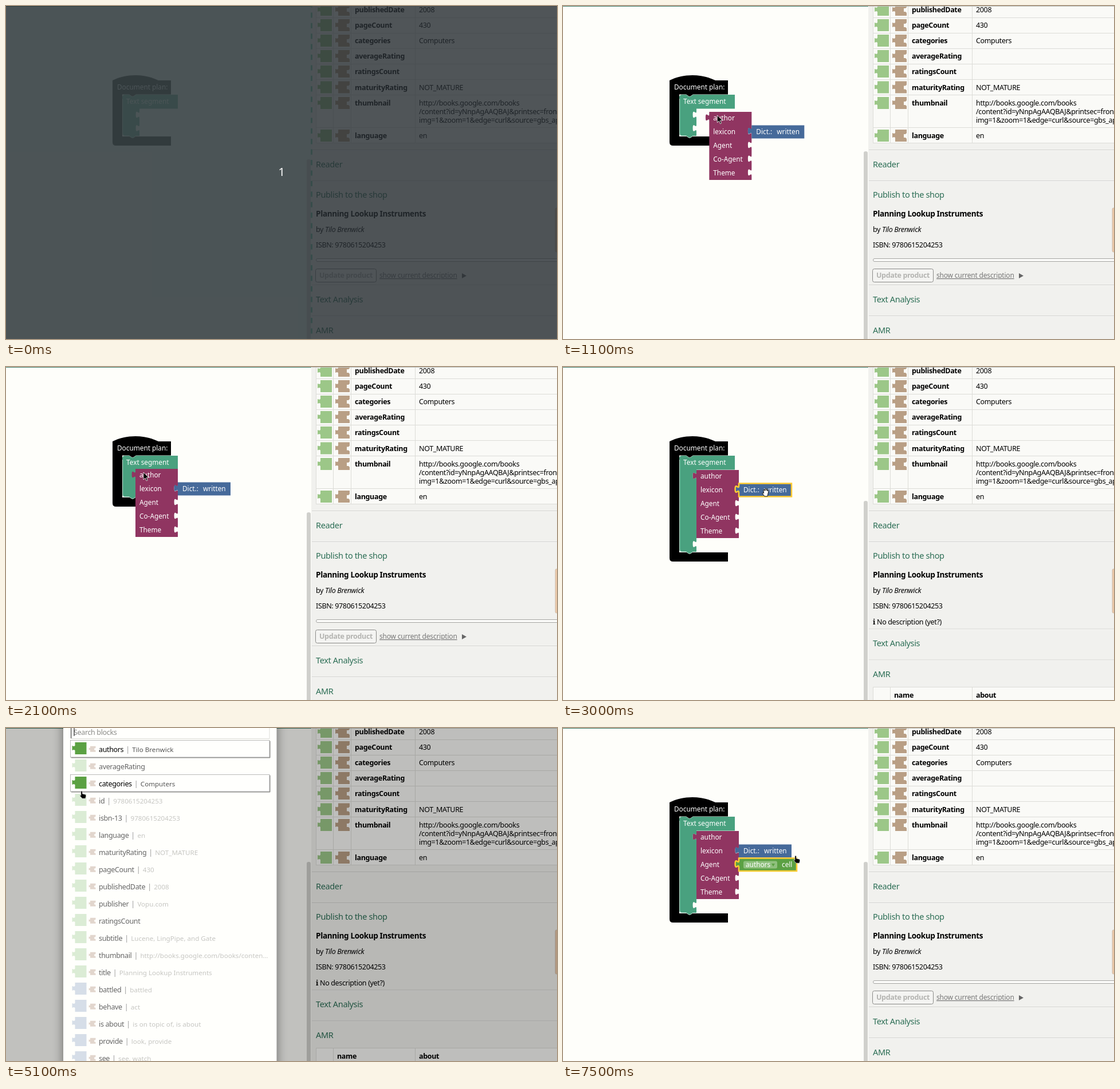
Write an HTML page that moves like this. It is 962 by 582 pixels and loops after 8000 ms.

```html
<!DOCTYPE html>
<html lang="en">
<head>
<meta charset="utf-8">
<title>Block editor</title>
<style>
  html, body { margin: 0; width: 100%; height: 100%; overflow: hidden; background: #fefefa; }
  svg { display: block; width: 962px; height: 582px; }
  text { font: 12.5px "Noto Sans", "Open Sans", sans-serif; letter-spacing: -.35px; white-space: pre; }
  .bold { font-weight: 600; }
  .title { font-weight: 600; font-size: 13.5px; }
  .head { font-size: 14.5px; fill: #2c6e55; }
  .link { font-size: 12px; letter-spacing: -.2px; fill: #777; text-decoration: underline; }
  .block { font-size: 11.8px; letter-spacing: 0; fill: #fff; }
  .value { font-size: 11.6px; letter-spacing: 0; }
  .count { font-size: 20px; fill: #fff; text-anchor: middle; }
</style>
</head>
<body>
<svg id="stage" viewBox="0 0 962 582"></svg>
<script>
const LOOP = 8000;
const YELLOW = '#fc3';
const PERSON = 'Tilo Brenwick';
const BOOK = 'Planning Lookup Instruments';
const ISBN = '9780615204253';

const stage = document.getElementById('stage');

// Last entry of a step table whose time has come
const at = (steps, t) => steps.filter(s => s[0] <= t).pop();

const text = (x, y, s, cls = '', more = '') =>
  `<text x="${x}" y="${y}" class="${cls}" ${more}>${s.replace(/&/g, '&amp;')}</text>`;
const rect = (x, y, w, h, fill, more = '') =>
  `<rect x="${x}" y="${y}" width="${w}" height="${h}" fill="${fill}" ${more}/>`;
const path = (d, fill, more = '') => `<path d="${d}" fill="${fill}" ${more}/>`;
const outline = on => on ? `stroke="${YELLOW}" stroke-width="2.5"` : '';

// Puzzle connector, drawn downwards and upwards
const DOWN = 'c0 8-6.4-6.4-6.4 6s6.4-2 6.4 6';
const UP = 'c0-8-6.4 6.4-6.4-6s6.4 2 6.4-6';

function piece(x, y, w, h, notches = []) {
  const right = notches.map(n => `V${y + n + 4}${DOWN}`).join('');
  return `M${x} ${y}h${w}${right}V${y + h}H${x}V${y + 16}${UP}z`;
}

/* ---------- workspace ---------- */

function plan(b) {
  const doc = `M186 130c24-12 56-12 80 0H288V154.5H227l-4.8 3.2h-2.4l-4.8-3.2H203V${b + 1}H288V${b + 17}H192q-6 0-6-6z`;
  const segment = `M208 155h7l4.8 3.2h2.4l4.8-3.2H300V179.5H233V184${DOWN}V${b - 19.5}${DOWN}V${b}` +
    `H227l-4.8 3.2h-2.4l-4.8-3.2H208q-5 0-5-5V160q0-5 5-5z`;
  return path(doc, '#000') + path(segment, '#49a17f') +
    path(`M203.5 162V${b - 5}q0 5 5 5h6.5l4.8 3.2h2.4l4.8-3.2`, 'none', 'stroke="#c4e3d5"') +
    text(194, 146, 'Document plan:', 'block') + text(210, 171, 'Text segment', 'block');
}

function author(x, y, picked) {
  const labels = ['author', 'lexicon', 'Agent', 'Co-Agent', 'Theme'];
  const body = path(piece(x, y, 74, 119, [24, 48, 72, 96]), '#903561', outline(picked === 'author'));
  const dict = path(piece(x + 74, y + 23.5, 92, 23), '#466a9a', outline(picked === 'dict'));
  return body + labels.map((s, i) => text(x + 7, y + 15 + i * 24, s, 'block')).join('') + dict +
    text(x + 82, y + 39, 'Dict.:', 'block') + text(x + 118, y + 39, 'written', 'block');
}

const cell = () =>
  path(piece(307, 227.5, 101, 22.5), '#5ba143', outline(true)) +
  rect(315, 232.5, 59, 13, '#8fc07e', 'rx="3"') +
  text(319, 243, 'authors', 'block') + path('M364 237h6l-3 5z', '#5ba143') +
  text(382, 243, 'cell', 'block');

const DROP = [
  [1300, 250, 178], [1400, 244, 177], [1500, 236, 176],
  [1800, 232, 176], [1900, 229, 177], [2000, 227, 178], [2100, 226, 178], [2400, 233, 180]
];

function dragged(t) {
  if (t >= 1300) return at(DROP, t).slice(1);
  const left = (1 - (t - 500) / 800) ** 2;
  return [250 + 85 * left, 178 + 110 * left];
}

function workspace(t) {
  const tall = t >= 2400;
  const top = tall ? 234 : t >= 500 ? 254 : 268;
  let s = rect(0, 0, 534, 582, '#fefefa') + plan(tall ? 323 : 227);
  if (t < 500) s += rect(0, 1, 534, 582, 'rgba(199,235,221,.5)');
  s += rect(525, top, 7, 400, t < 500 ? '#ced1cc' : '#d0d0cc', 'rx="3"');
  return s + rect(0, 0, 534, 1, '#3f7c69');
}

/* ---------- right panel ---------- */

// Small square piece with a stubby tab, and a socket if asked for
function icon(x, y, fill, socket = false, size = 20) {
  const u = size / 20;
  const right = socket ? `v${6 * u}l${-2 * u} ${2 * u}h${-3 * u}v${6 * u}h${3 * u}l${2 * u} ${2 * u}` : '';
  return path(`M${x} ${y - 10 * u}h${size}${right}V${y + 11 * u}H${x}V${y + 4 * u}` +
    `l${-2 * u} ${-u}l${-3 * u} ${u}v${-8 * u}l${3 * u} ${u}l${2 * u} ${-u}z`, fill);
}

const vline = (x, y, h) => rect(x, y, 1, h, '#dcdcd8');
const divider = y => rect(534, y, 428, 1, '#d2d2cf') + rect(534, y + 1, 428, 1, '#f8f8f6');

const FIELDS = [
  [6, 'publishedDate', '2008'], [33, 'pageCount', '430'], [60, 'categories', 'Computers'],
  [87, 'averageRating', ''], [114, 'ratingsCount', ''], [141.5, 'maturityRating', 'NOT_MATURE'],
  [169, 'thumbnail', 'http://books.google.com/books'], [226, 'language', 'en']
];

function fields() {
  let s = rect(541, 0, 421, 240, '#fafaf7');
  s += [20, 47, 74, 101, 128, 155, 212, 239].map(y => rect(541, y, 421, 1, '#dcdcd8')).join('');
  s += [541, 571, 602, 714].map(x => vline(x, 0, 240)).join('');
  for (const [y, name, value] of FIELDS)
    s += icon(549, y, '#9cc788') + icon(580, y, '#b99f85', true) +
      text(609, y + 5, name, 'bold') + text(721, y + 5, value);
  return s + text(721, 188.5, '/content?id=yNnpAgAAQBAJ&printsec=frontcover') +
    text(721, 203.5, 'img=1&zoom=1&edge=curl&source=gbs_api');
}

function product() {
  return rect(541.5, 441.5, 440, 5, '#fbfbf9', 'rx="2.5" stroke="#a5a5a2"') +
    rect(540.5, 459.5, 106, 23, '#f4f4f2', 'rx="3" stroke="#8a8a88"') +
    text(547, 475, 'Update product', 'bold', 'fill="#b4b4b1"') +
    text(652, 475, 'show current description', 'link') +
    path('M796 467v9l8-4.5z', '#666');
}

function missing() {
  return `<text x="541" y="449.5" style="font-family:'Noto Serif',serif;font-weight:700">i</text>` +
    text(548, 449.5, 'No description (yet?)') +
    rect(541, 559, 421, 23, '#fafaf7') + rect(541, 559, 421, 1, '#dcdcd8') +
    [541, 571, 714].map(x => vline(x, 559, 23)).join('') +
    text(578, 577.5, 'name', 'bold') + text(721, 577.5, 'about', 'bold');
}

function panel(t) {
  const empty = t >= 2400 && t < 7000;
  const up = empty ? 29.5 : 0;
  return rect(533, 0, 429, 582, '#f1f1ee') + fields() + rect(534, 0, 428, 1, '#bcc0bc') +
    [251, 305, 487 - up, 541 - up].map(divider).join('') +
    text(541, 281.5, 'Reader', 'head') + text(541, 335, 'Publish to the shop', 'head') +
    text(541, 368, BOOK, 'title') +
    `<text x="541" y="395">by <tspan font-style="italic">${PERSON}</tspan></text>` +
    text(541, 422, 'ISBN: ' + ISBN) +
    rect(959, 353, 10, 77, '#ecc9a8', 'rx="2" stroke="#c9b9a8" stroke-width=".8"') +
    (empty ? missing() : product()) +
    text(541, 517.5 - up, 'Text Analysis', 'head') + text(541, 571.5 - up, 'AMR', 'head');
}

/* ---------- block search ---------- */

const ENTRIES = [
  ['authors', PERSON], ['averageRating'], ['categories', 'Computers'], ['id', ISBN],
  ['isbn-13', ISBN], ['language', 'en'], ['maturityRating', 'NOT_MATURE'], ['pageCount', '430'],
  ['publishedDate', '2008'], ['publisher', 'Vopu.com'], ['ratingsCount'],
  ['subtitle', 'Lucene, LingPipe, and Gate'],
  ['thumbnail', 'http://books.google.com/books/conten…'], ['title', BOOK],
  ['battled', 'battled'], ['behave', 'act'], ['is about', 'is on topic of, is about'],
  ['provide', 'look, provide'], ['see', 'see, watch']
];

function entry([name, value], i, lit) {
  const y = 36.5 + i * 30;
  const word = i > 13;
  const full = word ? '#466a9a' : '#5ba143';
  const pale = word ? '#d6dee8' : '#dbecd5';
  let s = '';
  if (lit) s += rect(113.5, y - 14, 348, 30, '#8a8a87', 'rx="1"') +
    rect(112.5, y - 15, 347.5, 29.5, '#fffffd', 'stroke="#aaa" stroke-width=".8"');
  s += icon(120.5, y - 1.5, lit ? full : pale) + icon(147, y, '#e2d6cd', true, 9.5);
  s += `<text x="162" y="${y + 5}" fill="${lit ? '#000' : '#666'}">${name}`;
  if (value) s += `<tspan dx="4" fill="#999">|</tspan>` +
    `<tspan dx="4.5" class="value" fill="${lit ? '#555' : '#c6c6c2'}">${value}</tspan>`;
  return s + '</text>';
}

function search(t) {
  const [, x, y] = at(CURSOR, t);
  const hover = x > 113 && x < 460 ? Math.floor((y - 21.5) / 30) : 0;
  const focused = t < 6200;
  let s = rect(0, 0, 962, 582, 'rgba(0,0,0,.24)') +
    rect(100, -20, 372.5, 622, '#fffffc', 'style="filter:drop-shadow(0 0 9px rgba(0,0,0,.45))"') +
    rect(113.5, -8, 346.5, 26.5, '#fffffd', 'stroke="#ddddd9"') +
    text(118, 11.5, 'Search blocks', '', 'fill="#8b8b88"');
  if (focused) s += rect(113, 0, 1.2, 18, '#444') + rect(118.5, 0, 1, 14, '#000');
  else s += rect(112.5, 21.5, 348, 600, 'none', 'stroke="#555" stroke-dasharray="1 1"');
  return s + ENTRIES.map((e, i) => entry(e, i, i === 0 || i === hover)).join('');
}

/* ---------- cursor ---------- */

const HAND = 'M2 0q1.5 0 1.5 2v3l5 1.2q1.6.5 1.2 3l-1 4H3L-1 8.5q0-1.5 1-1l.8.6V1q.2-1 1.2-1z';
const SHAPES = {
  arrow: path('M0 0V13l3-3 2.2 5 2-1-2-4.7h4z', '#000', 'stroke="#fff" stroke-width=".8"'),
  point: path(HAND, '#000', 'stroke="#fff" stroke-width=".6"'),
  open: path('M1 4q0-2 1.5-1.5l1 2V1q1-1.5 2 0v3l.5-3q1.5-1 1.7.5V5l1-2q1.5 0 1.3 1.5L9 9l-1 5H3L-1 9q0-1.6 1.5-1l1 .7z', '#fff', 'stroke="#000" stroke-width=".9"')
};

const CURSOR = [
  [2400, 247, 186, 'arrow'], [2500, 262, 190, 'open'], [2600, 290, 198, 'open'],
  [2700, 322, 207, 'open'], [2900, 340, 211, 'open'], [3000, 349, 212, 'open'],
  [4000, 351, 217, 'point'], [4700, 330, 300, 'point'], [4900, 282, 268, 'point'],
  [5000, 205, 200, 'point'], [5100, 130, 110, 'point'], [5200, 75, 52, 'arrow'],
  [5300, 96, 34, 'arrow'], [5400, 161, 24, 'point'], [5600, 154, 24, 'arrow'],
  [5700, 147, 25, 'arrow'], [5800, 141, 25, 'arrow'], [5900, 137, 26, 'arrow'],
  [6600, 300, 160, 'arrow'], [6700, 399, 233, 'arrow'], [7500, 404, 223, 'point']
];

function cursor(t) {
  if (t < 500) return '';
  let [, x, y, kind] = at(CURSOR, t) || [];
  if (t < 2400) {
    [x, y] = dragged(t);
    x += 14; y += 6; kind = 'arrow';
  }
  return `<g transform="translate(${x} ${y})">${SHAPES[kind]}</g>`;
}

/* ---------- scene ---------- */

function scene(t) {
  let s = workspace(t) + panel(t);
  if (t >= 500) {
    const picked = t >= 6500 || t < 2400 ? '' : t >= 2900 ? 'dict' : 'author';
    s += author(...dragged(t), picked);
  } else {
    s += path('M533.5 -7V582', 'none', 'stroke="#7fccb2" stroke-width="3" stroke-dasharray="9.2 9.2"');
  }
  if (t >= 6500) s += cell();
  if (t >= 4000 && t < 6500) s += search(t);
  if (t < 100) s += rect(0, 0, 962, 582, 'rgba(38,44,49,.8)') + text(481, 297, '1', 'count');
  return s + cursor(t);
}

const start = performance.now();
let shown = -1;

function draw() {
  const t = Math.floor(((performance.now() - start) % LOOP) / 100) * 100;
  if (t !== shown) {
    stage.innerHTML = scene(t);
    shown = t;
  }
  requestAnimationFrame(draw);
}
draw();
</script>
</body>
</html>
```
